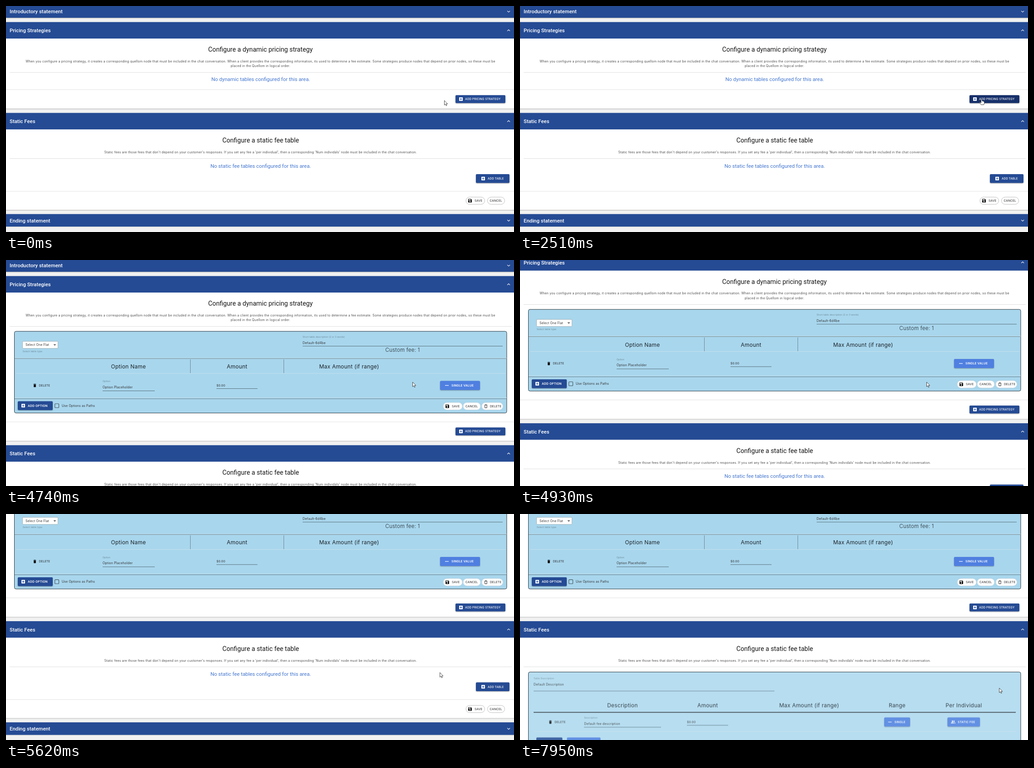
An HTML page that plays this animation: 1120 by 500 pixels, repeating every 8 s.

```html
<!DOCTYPE html>
<html lang="en">
<head>
<meta charset="utf-8">
<title>Pricing settings</title>
<style>
  html, body { margin: 0; width: 100%; height: 100%; overflow: hidden; background: #fff; }
  svg { display: block; }
  text { font-family: Inter, "Open Sans", sans-serif; letter-spacing: .025em; white-space: pre; }
  text.k { font-family: Roboto, "Open Sans", sans-serif; letter-spacing: 0; }
  .lift { filter: drop-shadow(0 1px 1px rgba(0, 0, 0, .35)); }
</style>
</head>
<body>
<svg id="stage" width="1120" height="500" viewBox="0 0 1120 500"></svg>
<script>
const BLUE = '#254b94', DARK = '#16306a', SKY = '#a8d6ed', BRIGHT = '#4f7fe0';
const LOOP = 8000;

// ---------- drawing helpers ----------
// cy is the middle of the capitals
function txt(s, x, cy, size = 7, o = {}) {
  const { fill = '#333', w = 400, a = 'start', k = '', id = '' } = o;
  return `<text ${id && `id="${id}"`} class="${k}" x="${x}" y="${(cy + size * .36).toFixed(2)}" font-size="${size}"
    font-weight="${w}" fill="${fill}" text-anchor="${a}">${s}</text>`;
}
const mid = (s, x, cy, size, o = {}) => txt(s, x, cy, size, { ...o, a: 'middle' });
const box = (x, y, w, h, fill, extra = '') =>
  `<rect x="${x}" y="${y}" width="${w}" height="${h}" fill="${fill}" ${extra}/>`;
const hline = (x1, x2, y, color, w = 1) =>
  `<path d="M${x1} ${y}H${x2}" stroke="${color}" stroke-width="${w}" fill="none"/>`;
const vline = (x, y1, y2, color) => `<path d="M${x} ${y1}V${y2}" stroke="${color}"/>`;
const group = (id, s) => `<g id="${id}">${s}</g>`;
const at = (x, y, s) => `<g transform="translate(${x} ${y})">${s}</g>`;

const icons = {
  plus: c => box(-4, -4, 8, 8, '#fff', 'rx="1"') + `<path d="M-2.5 0H2.5M0-2.5V2.5" stroke="${c}" stroke-width="1.1"/>`,
  minus: () => `<path d="M-4 0H4" stroke="#fff" stroke-width="1.2"/>`,
  save: () => `<path d="M-4-3.2Q-4-4-3.2-4H2.2L4-2.2V3.2Q4 4 3.2 4H-3.2Q-4 4-4 3.2Z" fill="#111"/>` +
    box(-2.8, -2.9, 4.4, 2, '#fff') + `<circle cy="1.6" r="1.3" fill="#fff"/>`,
  bin: () => `<path d="M-2.4-1.9H2.4V3Q2.4 3.8 1.6 3.8H-1.6Q-2.4 3.8-2.4 3ZM-3-3.2H-1.2L-.7-3.8H.7L1.2-3.2H3V-2.4H-3Z" fill="#111"/>`,
  binLine: () => `<path d="M-2.2-2V3.4H2.2V-2M-3.1-2.6H3.1M-1-3.6H1" stroke="#111" stroke-width=".9" fill="none"/>`,
  people: () => `<g fill="#fff"><circle cx="-1.5" cy="-1.6" r="1.7"/><circle cx="2" cy="-1.6" r="1.4"/>
    <path d="M-5 3V2Q-4.600.6-1.500.6T2 2V3ZM2.800 3V1.800L2.300.7Q4.900.9 5 2V3Z"/></g>`
};

function button(x, y, w, h, label, tx, size, icon, ix, o = {}) {
  const { fill = BLUE, weight = 500, id = '' } = o, cy = y + h / 2;
  const ripple = id && `<svg x="${x}" y="${y}" width="${w}" height="${h}"><circle id="${id}Ripple" fill="#fff" opacity="0"/></svg>`;
  return box(x, y, w, h, fill, `rx="2" class="lift" ${id && `id="${id}"`}`) + ripple +
    (icon ? at(ix, cy, icons[icon](fill)) : '') + txt(label, tx, cy, size, { fill: '#fff', w: weight });
}
function pill(x, y, w, label, tx, icon, ix, stroke = '#d5dde2') {
  return box(x, y, w, 16, '#fff', `rx="8" stroke="${stroke}" stroke-width=".9"`) +
    (icon ? at(ix, y + 8, icons[icon]()) : '') + txt(label, tx, y + 8.2, 6.5, { fill: '#222' });
}
function bar(y, h, label, open) {
  const cy = y + h / 2 + .2, d = open ? 1.4 : -1.4;
  return box(0, y, 1120, h, BLUE) + txt(label, 8, cy, 11.4, { fill: '#fff', w: 500, k: 'k' }) +
    `<path d="M1105.200 ${cy + d}L1108.200 ${cy - d}L1111.200 ${cy + d}" stroke="#fff" stroke-width="1.100" fill="none"/>`;
}
const gap = (y, h) => box(0, y, 1120, h, '#f1f1f1') + hline(0, 1120, y + .5, '#bdbdbd') + hline(0, 1120, y + 1.5, '#dedede');
const deleteRow = (x, y) => at(x, y, icons.bin()) + txt('DELETE', x + 9.3, y + .2, 6.3, { fill: '#222' });
const frame = (id, y, h) =>
  box(18.5, y, 1085.5, h, SKY, `rx="3.5" id="${id}Fill"`) +
  box(18.5, y, 1085.5, h, 'none', 'rx="3.5" stroke="#26343c"');

// ---------- parts of the page ----------
const small = { fill: '#6b8896' }, blueText = { fill: '#4376cf', k: 'k' }, title = { fill: '#161616', k: 'k' };
const colHead = (s, x, y) => mid(s, x, y, 11.9, { fill: '#1c2429' });

const top_ = bar(-2, 28, 'Introductory statement', false) + gap(26, 9.5) +
  bar(35.5, 36.5, 'Pricing Strategies', true) +
  mid('Configure a dynamic pricing strategy', 561, 96, 14.2, title) +
  mid('When you configure a pricing strategy, it creates a corresponding quellom node that must be included in the chat conversation. When a client provides the corresponding information, its used to determine a fee estimate. Some strategies produce nodes that depend on prior nodes, so these must be', 561, 122.5, 7, { fill: '#4c4c4c' }) +
  mid('placed in the Quellom in logical order.', 561, 132.8, 7, { fill: '#4c4c4c' }) +
  hline(8, 1115, 147, '#dedede') +
  group('noTables', mid('No dynamic tables configured for this area.', 561.5, 162, 11.4, blueText));

const picker = box(36.5, 180, 78, 15.5, '#fff', 'rx="1.5" stroke="#9aa7ad" stroke-width=".8"') +
  txt('Select One Flat', 43, 187.7, 6.9) + '<path d="M104.500 186.500H110.500L107.500 189.500Z" fill="#555"/>' +
  txt('Select table type', 36.8, 202, 5.2, small);

const body = hline(19, 1104, 218, '#70868f') +
  vline(406.5, 220, 250.5, '#708791') + vline(612.5, 220, 250.5, '#708791') +
  colHead('Option Name', 270, 235.8) + colHead('Amount', 509.5, 235.8) + colHead('Max Amount (if range)', 756.5, 235.8) +
  hline(22, 1101, 251, '#c6e2ee') +
  deleteRow(63.5, 277.5) +
  txt('Option', 213, 268.5, 5.2, small) + txt('Option Placeholder', 213, 281.5) + hline(213, 328, 289.5, '#58717c') +
  txt('$0.00', 464, 277.2, 6.7) + hline(464, 554.5, 284.5, '#58717c') +
  button(957, 267.5, 88, 20, 'SINGLE VALUE', 982, 6.6, 'minus', 972, { fill: BRIGHT, weight: 600 }) +
  hline(19, 1104, 304.5, '#c0deeb') + hline(19, 1104, 307, '#667f8a') +
  button(26, 312.5, 77, 19.5, 'ADD OPTION', 48, 6.7, 'plus', 38, { weight: 600 }) +
  box(107.7, 318, 8.8, 8.8, 'none', 'rx="1" stroke="#42545d" stroke-width="1.1"') +
  txt('Use Options as Paths', 123, 322.2, 6.9) +
  pill(964, 315.5, 42, 'SAVE', 983, 'save', 973) + pill(1008, 315.5, 38, 'CANCEL', 1013, '', 0) +
  pill(1049, 315.5, 46.5, 'DELETE', 1067, 'binLine', 1058);

const card = group('card', frame('card', 157.8, 180.7) + group('picker', picker) +
  hline(19, 1104, 217, '#c6e2ee') +
  txt('Default-6d4be', 654, 183.2, 7) +
  txt('Short table description (2 or 3 words)', 654, 183.2, 7, { ...small, id: 'hint' }) +
  hline(654, 1095, 190.5, '#58717c') +
  mid('Custom fee: 1', 874.5, 199.2, 11.5, { w: 300, fill: '#20282c' }) + group('body', body));

const tail = mid('No static fee tables configured for this area.', 561.5, 353.5, 11.4, blueText) +
  button(1036, 372, 74, 19.5, 'ADD TABLE', 1062, 6.2, 'plus', 1052, { id: 'addTable' }) +
  hline(0, 1120, 410, '#e2e2e2') +
  pill(1014, 422.8, 41.5, 'SAVE', 1033, 'save', 1023, '#b8b8b8') + pill(1061.5, 422.8, 38, 'CANCEL', 1066.5, '', 0, '#b8b8b8') +
  gap(451, 9.3) + bar(460.3, 28, 'Ending statement', false) + box(0, 488.3, 1120, 300, '#f1f1f1') +
  hline(0, 1120, 488.8, '#d4d4d4');

const feeBody = txt('Table Description', 30, 363.5, 5.2, small) + txt('Default Description', 30, 376, 7) +
  hline(30, 561, 391, '#58717c') +
  [['Description', 226], ['Amount', 413.7], ['Max Amount (if range)', 637.5], ['Range', 831.5], ['Per Individual', 978.5]]
    .map(([s, x]) => colHead(s, x, 422.8)).join('') +
  hline(30, 1093, 438.2, '#111', 1.4) +
  deleteRow(67, 459.6) +
  txt('Description', 141.5, 450.3, 5.2, small) + txt('Default fee description', 141.5, 463.2) + hline(141, 311, 471, '#58717c') +
  txt('$0.00', 368, 459.2, 6.7) + hline(368, 459, 466.8, '#58717c') +
  button(803, 449.6, 57, 20, 'SINGLE', 825.5, 6.5, 'minus', 815.5, { fill: BRIGHT, weight: 600 }) +
  button(942.5, 449.6, 71.5, 20, 'STATIC FEE', 965, 6.6, 'people', 955, { fill: BRIGHT, weight: 600 }) +
  hline(30, 1093, 480.5, '#cfe3ec') +
  box(36, 493.8, 57.5, 20, BLUE, 'rx="2"') + box(103.5, 493.8, 74, 20, BRIGHT, 'rx="2"');

const lower = hline(0, 1120, 185, '#e2e2e2') +
  button(991, 197.3, 110, 17.5, 'ADD PRICING STRATEGY', 1012.3, 6.25, 'plus', 1003, { id: 'addPricing' }) +
  gap(227, 9.5) + bar(236.5, 36.5, 'Static Fees', true) +
  mid('Configure a static fee table', 561.5, 296.8, 14.2, title) +
  mid("Static fees are those fees that don't depend on your customer's responses. If you set any fee a 'per individual', then a corresponding 'Num individals' node must be included in the chat conversation.", 561.3, 323.5, 7, { fill: '#4c4c4c' }) +
  hline(8, 1115, 337.5, '#dedede') +
  group('tail', tail) + group('fees', frame('fees', 349, 240) + group('feeBody', feeBody));

const pointer = group('cursor',
  '<path id="arrow" d="M0 0V10.200L2.300 8.100L3.900 11.700L5.500 11L3.900 7.500H7.100Z" fill="#fff" stroke="#222" stroke-width=".8"/>' +
  '<path id="hand" d="M-1 1Q0-.4 1 1V4.600Q2.600 4 3 5.200Q4.500 4.700 4.800 5.800Q6.300 5.500 6.200 7.200V9.500L5 13H-.8L-3.900 8.600Q-4.300 7-2.700 7.400L-1 9Z" fill="#fff" stroke="#222" stroke-width=".8"/>');

const $ = id => document.getElementById(id);
$('stage').innerHTML = box(0, 0, 1120, 500, '#fff') + group('page', top_ + card + group('lower', lower)) + pointer;

// ---------- motion ----------
const clamp = v => Math.min(1, Math.max(0, v));
const smooth = p => p * p * (3 - 2 * p);
const ramp = (t, a, b) => clamp((t - a) / (b - a));
const show = (id, on) => $(id).setAttribute('display', on ? 'inline' : 'none');
const fade = (id, v) => $(id).setAttribute('opacity', v);
const move = (id, x, y, s = 1) => $(id).setAttribute('transform', `translate(${x} ${y}) scale(${s})`);

// rows are [time, value, ...]
function track(rows, t, ease = p => p) {
  const i = rows.findIndex(r => r[0] > t);
  if (i < 0) return rows[rows.length - 1].slice(1);
  if (i === 0) return rows[0].slice(1);
  const a = rows[i - 1], b = rows[i], p = ease(ramp(t, a[0], b[0]));
  return a.slice(1).map((v, n) => v + (b[n + 1] - v) * p);
}
const mouse = [[930, 966.5, 209], [1450, 1017.5, 205.5], [3450, 1017.5, 205.5], [4060, 990, 222], [4200, 990, 222],
  [4730, 896.5, 270], [5420, 896.5, 270], [5790, 1003, 413], [5880, 1003, 413], [6440, 1056.7, 385]];
const scroll = [[4855, 0], [4930, 48], [5000, 86], [5070, 102], [5130, 109], [5200, 121.7], [5260, 138], [5350, 164], [5450, 172.6]];

function mix(a, b, p) {
  const part = (c, i) => parseInt(c.slice(i, i + 2), 16);
  return `rgb(${[1, 3, 5].map(i => Math.round(part(a, i) + (part(b, i) - part(a, i)) * p))})`;
}
function ripple(id, t, start, x, y, radius) {
  const el = $(id + 'Ripple');
  el.setAttribute('cx', x);
  el.setAttribute('cy', y);
  el.setAttribute('r', radius * Math.sqrt(ramp(t, start, start + 550)));
  el.setAttribute('opacity', t < start ? 0 : .2 * (1 - ramp(t, start + 260, start + 560)));
}

function draw(t) {
  const added = t >= 2640, cleared = t >= 2570, feesOn = t >= 7350;
  move('page', 0, -track(scroll, t)[0]);
  move('lower', 0, added ? 173.2 : cleared ? -28 : 0);
  show('noTables', !cleared);
  show('card', added);
  const a = smooth(ramp(t, 2600, 3380));
  $('cardFill').setAttribute('fill-opacity', t < 3380 ? .15 + .85 * a : 1);
  fade('picker', .1 + .9 * a * a);
  fade('body', smooth(ramp(t, 3150, 3900)));
  // the hint shrinks into a label above the field
  const h = smooth(ramp(t, 3130, 3340)), s = 1 - .286 * h;
  move('hint', 654 * (1 - s), 183.2 * (1 - s) - 13 * h, s);

  show('tail', !feesOn);
  show('fees', feesOn);
  const f = .82 * smooth(ramp(t, 7350, 7960));
  $('feesFill').setAttribute('fill-opacity', f);
  fade('feeBody', f);

  const [x, y] = track(mouse, t, smooth);
  const onPricing = !cleared && x >= 991, onTable = !feesOn && t > 5880 && x >= 1036;
  move('cursor', x, y);
  show('hand', onPricing || onTable);
  show('arrow', !onPricing && !onTable);
  $('addPricing').setAttribute('fill', mix(BLUE, DARK, cleared ? 0 : ramp(t, 1190, 1440)));
  $('addTable').setAttribute('fill', mix(BLUE, DARK, ramp(t, 6190, 6440)));
  ripple('addPricing', t, 1830, 26.5, 8.5, 85);
  ripple('addTable', t, 6810, 20.7, 13, 58);
}

const began = performance.now();
function tick() {
  draw((performance.now() - began) % LOOP);
  requestAnimationFrame(tick);
}
draw(0);
requestAnimationFrame(tick);
</script>
</body>
</html>
```
